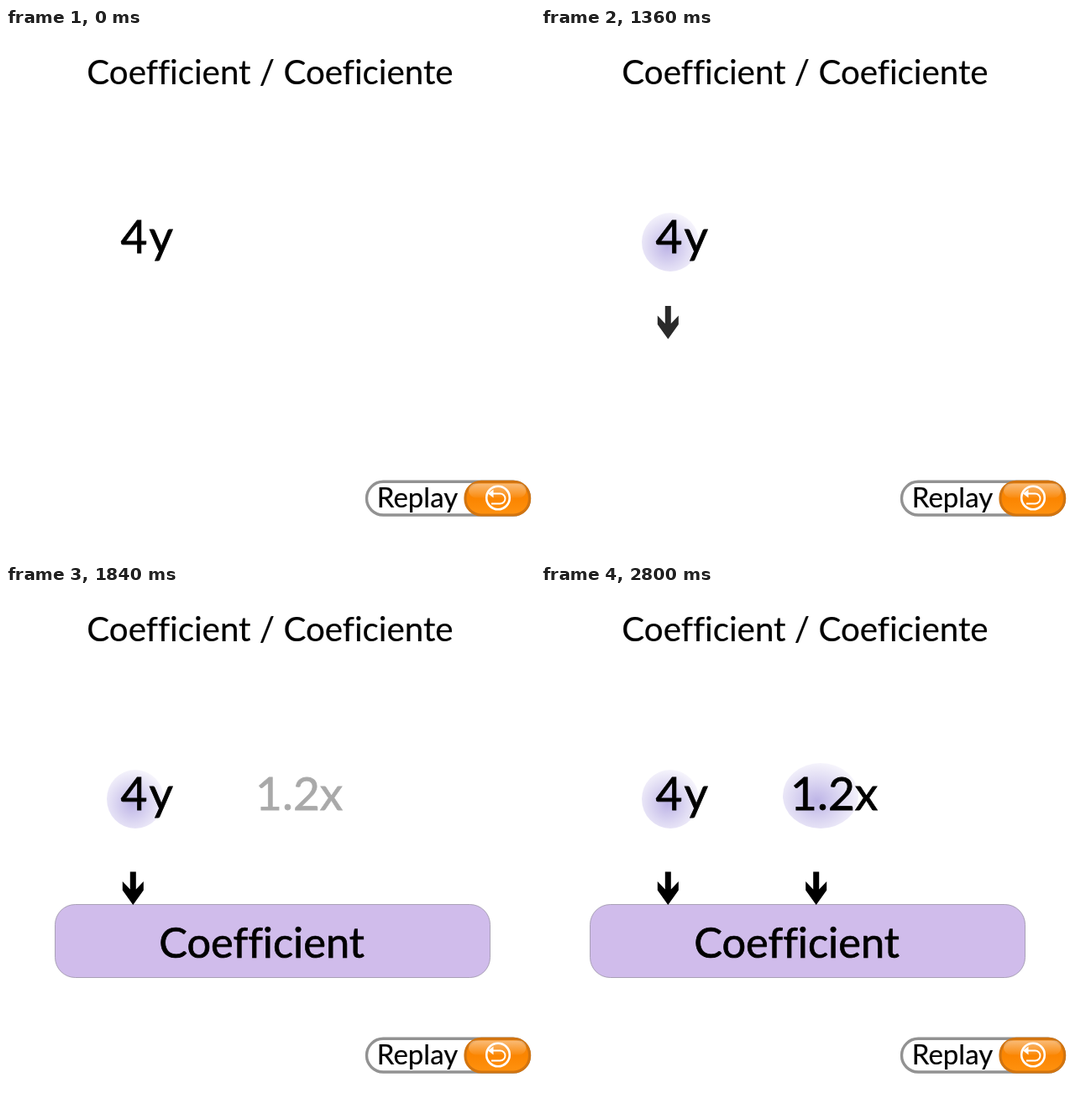
An HTML page for the animation above (2880 ms loop, 630x630 px).

```html
<!DOCTYPE html>
<html lang="en">
<head>
<meta charset="utf-8">
<title>Coefficient</title>
<style>
  html, body { margin: 0; width: 100%; height: 100%; overflow: hidden; background: #fff; }
  svg { display: block; width: 630px; height: 630px; }
  text { font-family: Lato, "Open Sans", sans-serif; font-variant-ligatures: none; stroke: #000; stroke-width: .2; }
  .term { font-size: 55px; stroke-width: .8; }
</style>
</head>
<body>
<svg viewBox="0 0 630 630">
  <defs>
    <radialGradient id="glow" cx=".45" cy=".58" r=".62">
      <stop offset="0" stop-color="#bdb4e6"/>
      <stop offset=".5" stop-color="#dcd7f2"/>
      <stop offset="1" stop-color="#f9f8fd"/>
    </radialGradient>
    <linearGradient id="orange" x2="0" y2="1">
      <stop offset="0" stop-color="#f58a14"/>
      <stop offset=".5" stop-color="#fb8500"/>
      <stop offset="1" stop-color="#ff9210"/>
    </linearGradient>
    <linearGradient id="shine" x2="0" y2="1">
      <stop offset="0" stop-color="#fff" stop-opacity=".42"/>
      <stop offset="1" stop-color="#fff" stop-opacity=".05"/>
    </linearGradient>
    <path id="arrow" d="M-3.5 0H3.5V21L12.5 11.5V22L0 39.5L-12.5 22V11.5L-3.5 21Z"/>
  </defs>

  <text x="314.5" y="67" font-size="40.3" text-anchor="middle">Coefficient / Coeficiente</text>

  <ellipse id="glow1" cx="154" cy="255" rx="34" ry="35" fill="url(#glow)"/>
  <ellipse id="glow2" cx="333" cy="251" rx="45" ry="39" fill="url(#glow)"/>
  <text class="term" x="136.5" y="268">4<tspan dx="2">y</tspan></text>
  <text class="term" id="decimal" x="297" y="268">1.2x</text>

  <g id="panel">
    <rect x="58.5" y="380.5" width="518" height="87" rx="24" fill="#d0bceb" stroke="#9a92a6" stroke-width=".8"/>
    <text x="304.5" y="444" font-size="50.5" text-anchor="middle" style="stroke-width:.7">Coefficient</text>
  </g>
  <use id="arrow1" href="#arrow"/>
  <use id="arrow2" href="#arrow"/>

  <rect x="429.5" y="540.3" width="194" height="39.7" rx="19.8" fill="#fff" stroke="#929292" stroke-width="3.4"/>
  <text x="490" y="571" font-size="33" text-anchor="middle">Replay</text>
  <rect x="547" y="540.3" width="76.5" height="39.7" rx="19" fill="url(#orange)" stroke="#d2740f" stroke-width="3.2"/>
  <rect x="551" y="542.5" width="68.5" height="17" rx="8.5" fill="url(#shine)"/>
  <g fill="none" stroke="#fff" stroke-width="2.6">
    <circle cx="586" cy="559.5" r="13.8"/>
    <path d="M579 554.5H588.5A6 6 0 0 1 588.5 566.5H578" stroke-width="2"/>
    <path d="M574 554.5L580.5 549.5V559.5Z" fill="#fff" stroke="none"/>
  </g>
</svg>
<script>
const STEP = 80, LOOP = 2880;
const el = id => document.getElementById(id);
const clamp = k => Math.max(0, Math.min(1, k));

function fade(id, k) {
  el(id).setAttribute('opacity', clamp(k));
}

// Fades in while drifting up to its resting place.
function showGlow(id, age, rise) {
  const k = age < 0 ? 0 : clamp((age + 2) / 6);
  fade(id, k);
  el(id).setAttribute('transform', `translate(${1.5 * (1 - k)} ${rise * (1 - k)})`);
}

// Drops onto the panel in six equal steps.
function showArrow(id, x, count) {
  const k = clamp(count / 6);
  fade(id, k);
  el(id).setAttribute('transform', `translate(${x} ${278.5 + 63 * k})`);
}

function draw(ms) {
  const n = Math.floor(ms % LOOP / STEP);
  showGlow('glow1', n - 8, 4.5);
  showArrow('arrow1', 151.3, n < 12 ? 0 : n < 14 ? 1 : n - 12);
  fade('panel', n < 18 ? 0 : 1 / 3 + (n - 18) / 4);
  fade('decimal', (n - 21) / 6);
  showGlow('glow2', n - 28, 2);
  showArrow('arrow2', 327.7, n - 29);
}

const start = performance.now();
function tick() {
  draw(performance.now() - start);
  requestAnimationFrame(tick);
}
tick();
</script>
</body>
</html>
```
